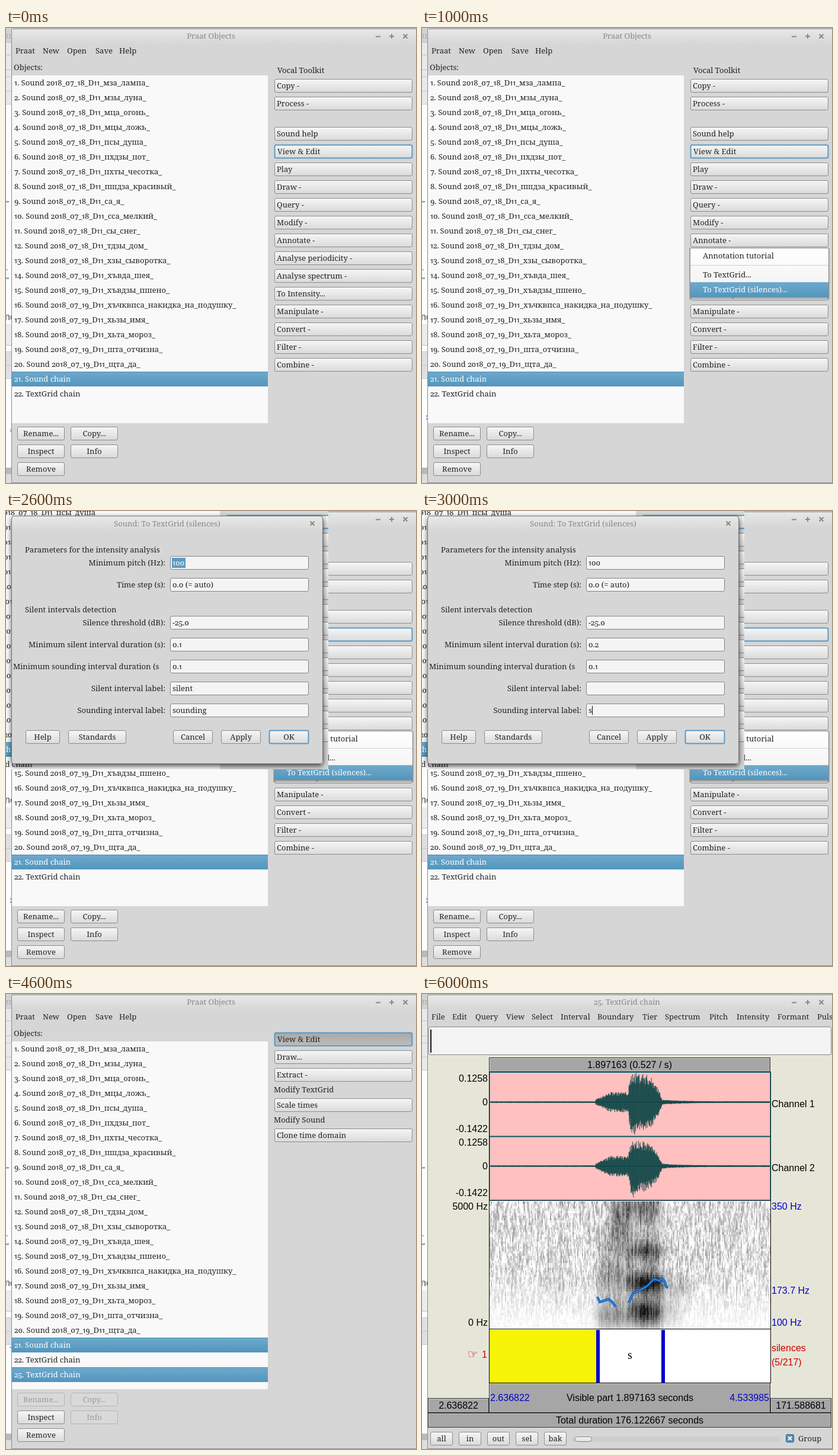
An HTML page for the animation above (7 s loop, 692 px wide and 768 px high).

```html
<!DOCTYPE html>
<html lang="en">
<head>
<meta charset="utf-8">
<title>Sound annotation</title>
<style>
html, body { margin: 0; width: 100%; height: 100%; overflow: hidden; background: #d6d6d6; }
svg { display: block; font: 13px "Noto Serif", serif; font-variant-numeric: oldstyle-nums proportional-nums; }
.sans { font: 16px "Liberation Sans", Arial, sans-serif; }
.note { font: 13px "Liberation Sans", Arial, sans-serif; }
.mark { font: 20px "Liberation Serif", serif; }
.hand { font: 20px "DejaVu Sans", sans-serif; }
.cells { shape-rendering: crispEdges; }
</style>
</head>
<body>
<svg id="stage" width="692" height="768" viewBox="0 0 692 768"></svg>
<script>
const INK = '#222', DIM = '#888', BLUE = '#5a9bc4', NAVY = '#0000d0', RED = '#d00000', TEAL = '#004040', PINK = '#ffc0c0';

let seed = 7;
const random = () => (seed = seed * 16807 % 2147483647) / 2147483647;

const rect = (x, y, w, h, fill, extra = '') =>
  `<rect x="${x}" y="${y}" width="${w}" height="${h}" fill="${fill}" ${extra}/>`;
const path = (d, stroke, width = 1, extra = '') =>
  `<path d="${d}" fill="none" stroke="${stroke}" stroke-width="${width}" ${extra}/>`;
const text = (x, y, s, fill = INK, anchor = 'start', cls = '') =>
  `<text x="${x}" y="${y}" fill="${fill}" text-anchor="${anchor}" class="${cls}">${s}</text>`;
const sans = (x, y, s, fill = '#000', anchor = 'start') => text(x, y, s, fill, anchor, 'sans');
const gradient = (id, from, to) =>
  `<linearGradient id="${id}" x2="0" y2="1"><stop stop-color="${from}"/><stop offset="1" stop-color="${to}"/></linearGradient>`;

const defs = '<defs>' + gradient('bar', '#e8e8e8', '#d6d6d6') + gradient('button', '#f6f6f6', '#dadada') +
  gradient('pressed', '#a9a9a9', '#bcbcbc') + gradient('selected', '#6fa9cd', '#5296bc') +
  gradient('menu', '#fff', '#f0f0f0') +
  '<clipPath id="ghost"><rect width="544" height="436"/></clipPath>' +
  '<clipPath id="labels"><rect x="10" width="260" height="430"/></clipPath>' +
  '<filter id="shadow" x="-10%" y="-10%" width="120%" height="120%"><feDropShadow dx="0" dy="3" stdDeviation="5" flood-opacity=".75"/></filter></defs>';

// state: '' | 'focus' | 'pressed' | 'disabled'
function button(x, y, w, label, { state = '', center = false } = {}) {
  const focus = state === 'focus' || state === 'pressed', off = state === 'disabled';
  const fill = off ? '#d9d9d9' : state === 'pressed' ? 'url(#pressed)' : 'url(#button)';
  const border = focus ? BLUE : off ? '#b4b4b4' : '#8c8c8c';
  return rect(x + .5, y + .5, w - 1, 22, fill, `rx="2.5" stroke="${border}" stroke-width="${focus ? 2 : 1}"`) +
    text(center ? x + w / 2 : x + (focus ? 5 : 4), y + 16, label, off ? '#999' : INK, center ? 'middle' : 'start');
}

const cross = (x, y) => path(`M${x - 3.5} ${y - 3.5}l7 7m0-7l-7 7`, DIM, 2);

function backdrop(extra = '') {
  let s = rect(0, 0, 10, 768, '#fdfdfd') + rect(0, 0, 10, 129, '#e9e9e9') + rect(0, 0, 10, 24, '#d2d2d2') +
    rect(0, 500, 10, 36, '#ececec') + rect(0, 546, 10, 46, '#e0e0e4') + rect(0, 742, 10, 11, '#b9b9b9') + rect(0, 753, 10, 15, '#dedede');
  for (const y of [24, 45, 70, 82, 106, 128, 535, 546, 569, 591]) s += rect(0, y, 10, 1, '#c4c4c8');
  return s + text(0, 18, 'tt', '#aaa') + text(0, 301, '"', '#174a36') + text(0, 409, '.', '#7a5a10') +
    text(0, 430, '"', '#174a36') + sans(-2, 493, 'nc', '#444') + extra;
}

function frame(title, menus, extra) {
  return backdrop(extra) + rect(9, 0, 683, 768, '#d6d6d6') + rect(9, 1, 683, 27, 'url(#bar)') +
    path('M9.5 768V1.5H692M9 767.5H692', '#8a8a8a') + text(346, 18, title, DIM, 'middle') +
    path('M624 14.5h8M647 14h8m-4-4v8', DIM, 2) + cross(674, 14) +
    menus.map(([x, label]) => text(x, 43, label)).join('');
}

const words = ('мза_лампа мзы_луна мца_огонь мцы_ложь псы_душа пхдзы_пот пхты_чесотка пшдза_красивый са_я сса_мелкий ' +
  'сы_снег тдзы_дом хзы_сыворотка хъвда_шея хъвдзы_пшено хъчквпса_накидка_на_подушку хьзы_имя хьта_мороз шта_отчизна щта_да').split(' ');
const objects = words.map((w, i) => `${i + 1}. Sound 2018_07_${i < 13 ? 18 : 19}_D11_${w}_`)
  .concat('21. Sound chain', '22. TextGrid chain');

function objectWindow(paired, extra) {
  const rows = paired ? [...objects, '25. TextGrid chain'] : objects;
  let s = frame('Praat Objects', [[16, 'Praat'], [62, 'New'], [103, 'Open'], [151, 'Save'], [191, 'Help']], extra) +
    text(13, 71, 'Objects:') + rect(10, 80, 432, 587, '#f9f9f9');
  rows.forEach((row, i) => {
    const on = i === 20 || i === 22, y = 80 + 25 * i;
    if (on) s += rect(10, y, 432, 25, 'url(#selected)') + rect(10, y, 432, 1, '#4f8db2');
    s += text(14, y + 17, row, on ? '#fff' : INK);
  });
  const single = { center: true, state: paired ? 'disabled' : '' }, any = { center: true };
  s += button(19, 673, 80, 'Rename...', single) + button(109, 673, 80, 'Copy...', single) +
    button(19, 703, 80, 'Inspect', any) + button(109, 703, 80, 'Info', single) + button(19, 733, 80, 'Remove', any);

  const action = (y, label, state) => button(453, y, 233, label, { state });
  if (paired) {
    return s + action(65, 'View &amp; Edit', 'pressed') + action(95, 'Draw...') + action(125, 'Extract -') +
      text(452, 166, 'Modify TextGrid') + action(176, 'Scale times') +
      text(452, 217, 'Modify Sound') + action(227, 'Clone time domain');
  }
  const actions = ['Sound help', 'View &amp; Edit', 'Play', 'Draw -', 'Query -', 'Modify -', 'Annotate -', 'Analyse periodicity -',
    'Analyse spectrum -', 'To Intensity...', 'Manipulate -', 'Convert -', 'Filter -', 'Combine -'];
  return s + text(458, 76, 'Vocal Toolkit') + action(86, 'Copy -') + action(116, 'Process -') +
    actions.map((label, i) => action(167 + 30 * i, label, i === 1 ? 'focus' : '')).join('');
}

const annotateMenu = rect(451, 372, 237, 86, '#000', 'opacity=".18"') +
  rect(452.5, 371.5, 234, 83, 'url(#menu)', 'stroke="#8c8c8c"') + rect(453, 400, 233, 1, '#d0d0d0') +
  rect(453, 429, 233, 25, 'url(#selected)') + text(474, 389, 'Annotation tutorial') +
  text(474, 421, 'To TextGrid...') + text(474, 446, 'To TextGrid (silences)...', '#fff');

function dialog(values, edited) {
  const fields = [[76, 'Minimum pitch (Hz):'], [113, 'Time step (s):'], [177, 'Silence threshold (dB):'],
    [214, 'Minimum silent interval duration (s):'], [251, 'Minimum sounding interval duration (s'],
    [288, 'Silent interval label:'], [325, 'Sounding interval label:']];
  let s = `<g clip-path="url(#ghost)">${rect(0, 0, 544, 436, '#d6d6d6')}<g transform="translate(-81 -190)">${objectWindow(false)}</g>` +
    rect(10, 9, 525, 418, '#d6d6d6', 'rx="4" filter="url(#shadow)"') + '</g>' +
    rect(10, 9, 525, 27, 'url(#bar)', 'rx="4"') + rect(9.5, 8.5, 525, 418, 'none', 'rx="4" stroke="#777"') +
    text(272, 26, 'Sound: To TextGrid (silences)', DIM, 'middle') + cross(517, 21) +
    text(32, 70, 'Parameters for the intensity analysis') + text(32, 171, 'Silent intervals detection');
  fields.forEach(([y, label], i) => {
    const long = i === 4, picked = i === 0 && !edited;
    s += `<g clip-path="url(#labels)">${text(long ? 12 : 269, y + 16, label, INK, long ? 'start' : 'end')}</g>` +
      rect(277.5, y + .5, 233, 22, '#f4f4f4', 'rx="2.5" stroke="#858585"');
    if (picked) s += rect(280, y + 3, 23, 17, BLUE);
    s += text(281, y + 16, values[i], picked ? '#fff' : INK);
  });
  if (edited) s += rect(287, 329, 1, 15, '#000');
  const b = (x, w, label, state) => button(x, 370, w, label, { state, center: true });
  return s + b(33, 58, 'Help') + b(105, 98, 'Standards') + b(282, 67, 'Cancel') + b(363, 67, 'Apply') + b(444, 67, 'OK', 'focus');
}

// Vertical strokes about a centre line; envelope(x) gives the height up and down.
function wave(y, envelope, from = 114, to = 588) {
  let d = `M${from} ${y}H${to}`;
  for (let x = from; x < to; x += .7) {
    const [up, down] = envelope(x);
    d += `M${x.toFixed(1)} ${(y - .4 - up * (.6 + .4 * random())).toFixed(1)}V${(y + .4 + down * (.6 + .4 * random())).toFixed(1)}`;
  }
  return d;
}

// x, half-width, height
const bursts = [[118, 2, 4], [129, 5, 8], [136, 4, 8], [146, 4, 38], [169, 4, 36], [192, 4, 36], [210, 5, 36], [221, 4, 34], [234, 3, 33],
  [244, 3, 32], [257, 3, 5], [276, 4, 36], [299, 5, 28], [322, 4, 36], [345, 7, 46], [357, 5, 30], [372, 5, 46], [387, 3, 18], [400, 6, 9],
  [415, 3, 40], [440, 3, 54], [463, 4, 44], [474, 4, 50], [489, 3, 56], [500, 5, 32], [522, 5, 5], [546, 3, 40], [568, 4, 40], [586, 3, 14]];
const speech = x => {
  const a = Math.max(1, ...bursts.map(([c, w, h]) => h * Math.exp(-(Math.abs((x - c) / w) ** 1.6))));
  return [a, a * .88];
};
const syllable = peak => x => {
  if (x < 293) return [.9, .9];
  if (x < 349) { const a = 4 + 13 * Math.min(1, (x - 293) / 25); return [a, a]; }
  if (x < 405) {
    const a = Math.min(1, .5 + (x - 349) / 10) * (1 - ((x - 349) / 57) ** 4);
    return [a * (peak - 5) + 3, a * (peak - 4 + 10 * Math.exp(-(((x - 355) / 5) ** 2))) + 3];
  }
  const tail = 1 + 3 * Math.exp((405 - x) / 30);
  return [tail, tail];
};

// Blurred energy areas: centre x, y, half-width, half-height, darkness
const energy = [[322, 540, 28, 26, .4], [322, 482, 28, 26, .28], [335, 370, 17, 45, .4], [324, 430, 28, 50, .22],
  [377, 535, 28, 22, .72], [377, 486, 29, 16, .72], [377, 432, 28, 14, .42], [376, 358, 27, 18, .4],
  [377, 450, 29, 120, .26], [425, 490, 35, 22, .16], [418, 535, 22, 25, .14], [225, 485, 28, 22, .08]];

function spectrogram() {
  const levels = Array.from({ length: 25 }, () => '');
  for (let x = 115; x < 588; x += 2) {
    let n = random();
    const stripe = .8 + .35 * random();
    for (let y = 350; y < 566; y += 4) {
      n += (random() - n) * .4;
      const hum = Math.max(0, .13 + (n - .5) * .8) * Math.min(1, (572 - y) / 110);
      const voice = energy.reduce((sum, [cx, cy, w, h, a]) => sum + a * Math.exp(-(((x - cx) / w) ** 4) - ((y - cy) / h) ** 2), 0);
      const dark = Math.min(.97, hum * (1 - Math.min(.8, voice)) + voice * stripe * (.75 + .5 * n));
      levels[Math.round(dark * 24)] += `M${x} ${y}v4`;
    }
  }
  const grey = i => 255 - Math.round(i * 10.2);
  return rect(114, 349, 474, 217, '#fff') + '<g class="cells">' +
    levels.map((d, i) => d && path(d, `rgb(${grey(i)},${grey(i)},${grey(i)})`, 2)).join('') + '</g>';
}

const slab = (x, y, w, h, label = '') => rect(x + .5, y + .5, w - 1, h - 1, '#a6a6a6', 'stroke="#333"') +
  path(`M${x + 1.5} ${y + h - 2}V${y + 1.5}H${x + w - 2}`, '#ccc') + sans(x + w / 2, y + 18, label, '#000', 'middle');

function editor(content, thumbX, thumbWidth) {
  const menus = [[16, 'File'], [51, 'Edit'], [90, 'Query'], [142, 'View'], [185, 'Select'], [234, 'Interval'], [296, 'Boundary'],
    [372, 'Tier'], [410, 'Spectrum'], [485, 'Pitch'], [531, 'Intensity'], [600, 'Formant'], [667, 'Pulses']];
  return frame('25. TextGrid chain', menus) + rect(10, 103, 682, 630, '#e6e6d8') +
    rect(11.5, 55.5, 679, 47, '#f4f4f4', 'rx="3" stroke="#858585"') + rect(14, 60, 2, 39, '#111') +
    rect(114, 132, 474, 524, '#fff') + content +
    path('M113.5 131.5H588.5V656.5H113.5ZM114 348.5H588M114 565.5H588', '#000') +
    path('M114.5 132.5H587.5V347.5H114.5Z', '#3aa0b4') + path('M114 240.5H588', '#0a5a5a', 2) +
    sans(590, 191, 'Channel 1') + sans(590, 299, 'Channel 2') +
    text(77, 615, '☞', RED, 'start', 'hand') + sans(110, 614, '1', RED, 'end') +
    sans(590, 603, 'silences', RED) + sans(590, 627, '(5/217)', RED) +
    ['all', 'in', 'out', 'sel', 'bak'].map((label, i) => button(14 + 48 * i, 739, 38, label, { center: true })).join('') +
    rect(253, 747, 351, 9, '#cecece', 'rx="3"') + rect(thumbX + .5, 747.5, thumbWidth, 8, 'url(#button)', 'rx="4" stroke="#888"') +
    rect(614.5, 743.5, 13, 13, '#4f8fb8', 'rx="2" stroke="#36627f"') + path('M618 747l6 6m0-6l-6 6', '#fff', 2) + text(635, 755, 'Group');
}

const scale = (top, zeroY, bottom) => [0, 108].map(dy => sans(111, 148 + dy, top, '#000', 'end') +
  sans(111, zeroY + dy, '0', '#000', 'end') + sans(111, 233 + dy, bottom, '#000', 'end')).join('');
const bars = xs => xs.map(x => rect(x, 567, 6, 89, NAVY)).join('');
const marks = xs => xs.map(x => text(x, 616, 's', '#000', 'middle', 'mark')).join('');

function overview() {
  const channel = path(wave(186, speech), '#000', .9) + rect(156, 133, 29, 107, PINK) +
    path(wave(186, speech, 156, 185), TEAL, .9);
  const boundaries = [126, 141, 147, 164, 171, 187, 193, 205, 222, 229, 245, 270, 277, 294, 301, 316, 323, 337, 360, 366, 378,
    410, 416, 434, 440, 456, 462, 467, 478, 484, 489, 494, 503, 541, 546, 563, 569, 584];
  return editor(channel + `<g transform="translate(0 108)">${channel}</g>` +
    path('M155.5 132V566M185.5 132V566', '#903030', 1, 'stroke-dasharray="2 2"') +
    text(351, 424, '(To see the analyses, zoom in to at most 10 seconds,', '#000', 'middle', 'note') +
    text(351, 497, 'or raise the “longest analysis” setting with “Show analyses” in the View menu.)', '#000', 'middle', 'note') +
    rect(154, 567, 10, 89, '#f8f408') + bars(boundaries) + marks([215, 239, 350, 375]) +
    scale('0.2238', 191, '-0.2233') + sans(153, 125, '2.636822', RED, 'end') + sans(187, 125, '4.533985', RED) +
    slab(155, 107, 31, 25) + slab(113, 656, 42, 26, '2.637') + slab(155, 656, 30, 26) + slab(185, 656, 403, 26, '25.466015') +
    slab(113, 682, 475, 25, 'Visible part 30.000000 seconds') + sans(115, 700, '0', NAVY) + sans(586, 700, '30.000000', NAVY, 'end') +
    slab(588, 682, 103, 25, '146.122667') + slab(113, 707, 578, 25, 'Total duration 176.122667 seconds'), 254, 57);
}

function closeUp() {
  const pitch = 'M296 511L300 520L315 515L321 520L327 528M349 521L356 505L362 503L380 493L392 481L400 484L405 480L410 486L412 494L415 496';
  return editor(rect(114, 132, 474, 216, PINK) + path(wave(182.5, syllable(52)), TEAL, .9) + path(wave(290.5, syllable(45)), TEAL, .9) +
    spectrogram() + path(pitch, '#0858c0', 4) + path(pitch, '#2a98f0', 1.5) +
    rect(114, 567, 180, 89, '#f8f408') + bars([294, 404]) + marks([351]) + scale('0.1258', 188, '-0.1422') +
    sans(111, 364, '5000 Hz', '#000', 'end') + sans(111, 560, '0 Hz', '#000', 'end') +
    sans(590, 364, '350 Hz', NAVY) + sans(590, 506, '173.7 Hz', NAVY) + sans(590, 560, '100 Hz', NAVY) +
    slab(113, 107, 475, 25, '1.897163 (0.527 / s)') + slab(113, 656, 475, 51) + sans(351, 687, 'Visible part 1.897163 seconds', '#000', 'middle') +
    sans(115, 687, '2.636822', NAVY) + sans(586, 687, '4.533985', NAVY, 'end') +
    slab(10, 682, 103, 25, '2.636822') + slab(588, 682, 103, 25, '171.588681') +
    slab(10, 707, 681, 25, 'Total duration 176.122667 seconds'), 258, 28);
}

const menuOpen = objectWindow(false, text(6, 661, ':', '#2222a0')) + annotateMenu;
const scenes = [
  objectWindow(false, text(6, 684, '=', '#2222a0')),
  menuOpen,
  menuOpen + dialog(['100', '0.0 (= auto)', '-25.0', '0.1', '0.1', 'silent', 'sounding'], false),
  menuOpen + dialog(['100', '0.0 (= auto)', '-25.0', '0.2', '0.1', '', 's'], true),
  objectWindow(true, text(6, 600, '-', '#444')),
  overview(),
  closeUp(),
];

const stage = document.getElementById('stage');
stage.innerHTML = defs + scenes.map(s => `<g class="scene" display="none">${s}</g>`).join('');
const groups = stage.querySelectorAll('.scene');

function draw() {
  const current = Math.floor(performance.now() / 1000) % scenes.length;
  groups.forEach((g, i) => g.setAttribute('display', i === current ? 'inline' : 'none'));
  requestAnimationFrame(draw);
}
draw();
</script>
</body>
</html>
```
